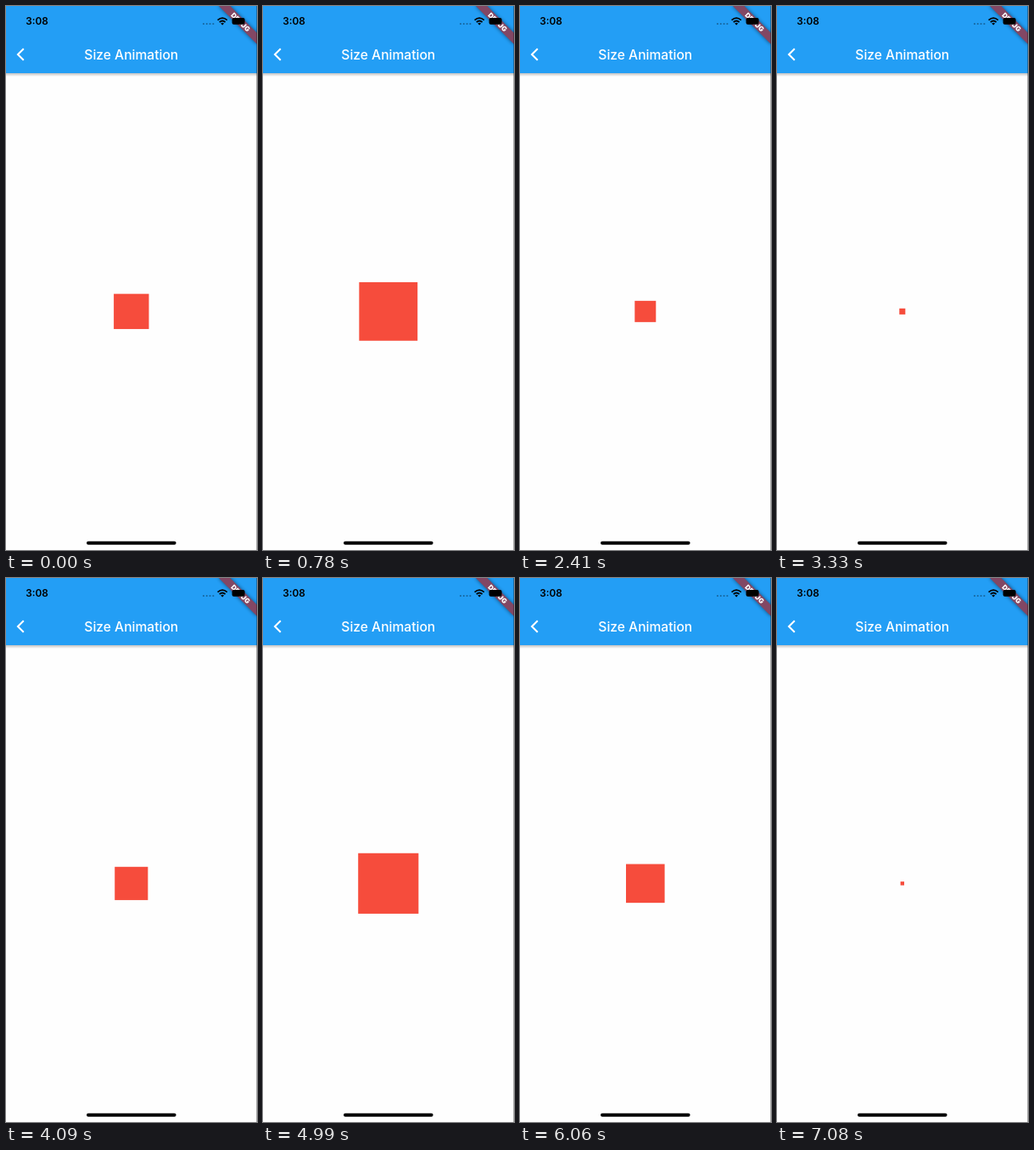
Recreate the animation shown at these times as an HTML page. Size 296x640 px, loop 7180 ms.

```html
<!DOCTYPE html>
<html lang="en">
<head>
<meta charset="utf-8">
<title>Size Animation</title>
<style>
  html, body { margin: 0; width: 100%; height: 100%; overflow: hidden; background: #fefefe; }
  svg { display: block; }
  text { font-family: Inter, Roboto, sans-serif; }
</style>
</head>
<body>
<svg width="296" height="640" viewBox="0 0 296 640">
  <defs>
    <linearGradient id="shade" x2="0" y2="1">
      <stop stop-opacity=".24"/>
      <stop offset="1" stop-opacity="0"/>
    </linearGradient>
    <filter id="glow" x="-30%" y="-100%" width="160%" height="300%">
      <feGaussianBlur stdDeviation="2.5"/>
    </filter>
  </defs>
  <rect width="296" height="640" fill="#fefefe"/>
  <rect id="box" fill="#f64c3c"/>

  <!-- App bar -->
  <rect y="79" width="296" height="4" fill="url(#shade)"/>
  <rect width="296" height="79" fill="#239ef5"/>
  <path d="M20.8 50.2 L14 57 L20.8 63.8" fill="none" stroke="#fff" stroke-width="2.1"/>
  <text x="147.8" y="62.6" font-size="15.6" font-weight="550" fill="#fff" text-anchor="middle">Size Animation</text>

  <!-- Debug banner, in logical pixels -->
  <g transform="scale(.7882) translate(375 0) rotate(45)" font-size="10.2" font-weight="900" text-anchor="middle">
    <rect x="-40" y="28" width="80" height="12" opacity=".5" filter="url(#glow)"/>
    <rect x="-40" y="28" width="80" height="12" fill="#824764"/>
    <text y="37.7" fill="#fff">DEBUG</text>
  </g>

  <!-- Status bar -->
  <text x="23.3" y="22.3" font-size="11.8" font-weight="600">3:08</text>
  <path d="M233 21 h12" stroke="#000" stroke-opacity=".35" stroke-width="2.2" stroke-linecap="round" stroke-dasharray="0 3.8"/>
  <g fill="none" stroke="#000" stroke-width="1.8">
    <path d="M249.6 16.7 Q255.2 11.6 260.8 16.7"/>
    <path d="M251.8 19 Q255.2 15.9 258.6 19"/>
  </g>
  <path d="M253.3 20.4 Q255.2 18.9 257.1 20.4 L255.2 22.4 Z"/>
  <rect x="266.6" y="14" width="15" height="7.8" rx="2"/>

  <!-- Home indicator and half-covered last column -->
  <rect x="95" y="629.8" width="105.6" height="4" rx="2"/>
  <rect x="295" width="1" height="640" fill-opacity=".3"/>
</svg>
<script>
  const LOOP = 7180, STEP = 120;
  const MAX_SIZE = 79, SWEEP = 2070, EMPTY_AT = 3055;
  const CENTER_X = 147.8, CENTER_Y = 359.35;

  // Triangle wave: grows and shrinks linearly, one sweep each way
  function sizeAt(t) {
    const phase = Math.abs(t - EMPTY_AT) / SWEEP % 2;
    return MAX_SIZE * (1 - Math.abs(1 - phase));
  }

  const box = document.getElementById("box");
  const start = performance.now();

  function draw() {
    const t = (performance.now() - start) % LOOP;
    const size = sizeAt(Math.floor(t / STEP) * STEP);
    box.setAttribute("x", CENTER_X - size / 2);
    box.setAttribute("y", CENTER_Y - size / 2);
    box.setAttribute("width", size);
    box.setAttribute("height", size);
    requestAnimationFrame(draw);
  }
  draw();
</script>
</body>
</html>
```
